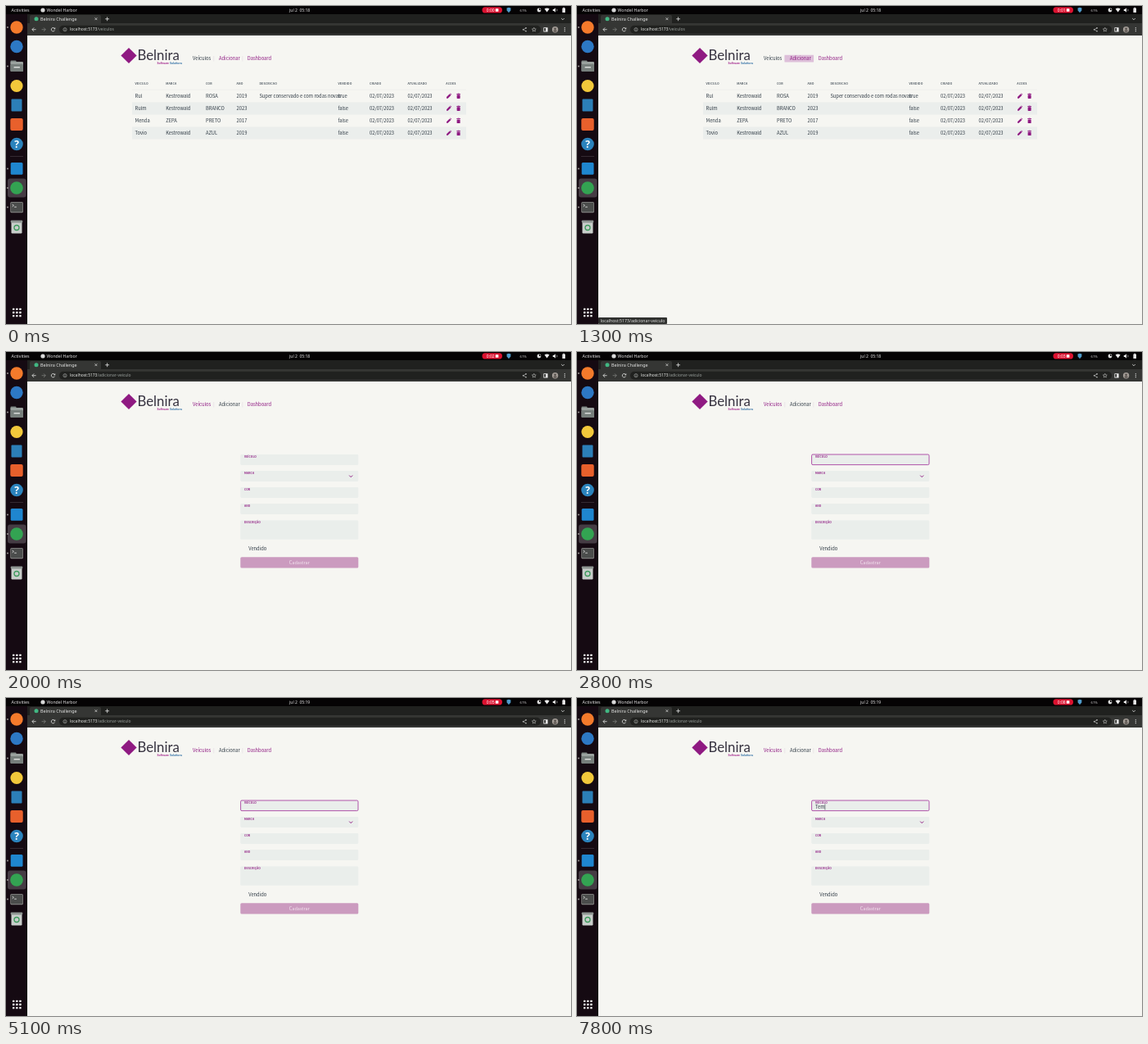
An HTML page with a canvas that plays this animation: 690 px wide and 388 px high, repeating every 8000 ms.

```html
<!DOCTYPE html>
<html lang="pt">
<head>
<meta charset="utf-8">
<title>Belnira Challenge</title>
<style>
html, body { margin: 0; width: 100%; height: 100%; overflow: hidden; background: #f6f6f2; }
canvas { display: block; width: 690px; height: 388px; }
</style>
</head>
<body>
<canvas id="stage"></canvas>
<script>
const W = 690, H = 388, LOOP = 8000;
const LEFT = 26, TOP = 36;
const canvas = document.getElementById('stage');
const ctx = canvas.getContext('2d');
const ratio = window.devicePixelRatio || 1;
canvas.width = W * ratio;
canvas.height = H * ratio;

const SYS = '"Noto Sans", "Open Sans", sans-serif';
const WEB = '"Noto Sans CJK JP", "Noto Sans CJK SC", "Noto Sans CJK", "Noto Sans", sans-serif';
const LOGO = 'Lato, sans-serif';
const PURPLE = '#8f1a82', INK = '#2f3a44', PAGE = '#f6f6f2', FIELD = '#eaeeeb';
const LIGHT = '#e4e5e4', STRIP = '#20211f', BAR = '#353634';

const clamp = v => Math.max(0, Math.min(1, v));

function box(x, y, w, h, color, r = 0) {
  ctx.fillStyle = color;
  ctx.beginPath();
  ctx.roundRect(x, y, w, h, r);
  ctx.fill();
}

function disc(x, y, r, color) {
  ctx.fillStyle = color;
  ctx.beginPath();
  ctx.arc(x, y, r, 0, Math.PI * 2);
  ctx.fill();
}

function ring(x, y, r, color, width = 0.8, from = 0, to = Math.PI * 2) {
  ctx.strokeStyle = color;
  ctx.lineWidth = width;
  ctx.beginPath();
  ctx.arc(x, y, r, from, to);
  ctx.stroke();
}

function trace(points) {
  ctx.beginPath();
  for (let i = 0; i < points.length; i += 2) ctx.lineTo(points[i], points[i + 1]);
}

function line(points, color, width = 0.8) {
  trace(points);
  ctx.strokeStyle = color;
  ctx.lineWidth = width;
  ctx.stroke();
}

function shape(points, color) {
  trace(points);
  ctx.fillStyle = color;
  ctx.fill();
}

// Text is placed by its left edge and the middle of its capitals.
// It is set large and scaled down, so that small sizes keep fractional advances.
const ZOOM = 16;
function label(str, x, y, size, color, { font = SYS, weight = 400, align = 'left', gap = 0 } = {}) {
  ctx.save();
  ctx.translate(x, y + size * 0.345);
  ctx.scale(1 / ZOOM, 1 / ZOOM);
  ctx.font = `${weight} ${size * ZOOM}px ${font}`;
  ctx.letterSpacing = gap * ZOOM + 'px';
  ctx.textAlign = align;
  ctx.fillStyle = color;
  ctx.fillText(str, 0, 0);
  const width = ctx.measureText(str).width / ZOOM;
  ctx.restore();
  return width;
}

const web = (str, x, y, color = INK, size = 5.75) => label(str, x, y, size, color, { font: WEB });

function topBar(t) {
  box(0, 0, W, 10, '#050304');
  label('Activities', 6.5, 5, 5.3, '#e6e6e6');
  disc(45, 5, 2.6, '#d8d8d8');
  label('Wondel Harbor', 49.5, 5, 5.2, '#e6e6e6');
  label('jul 2  05:' + (t < 3700 ? 18 : 19), 346, 5, 5, '#e6e6e6');

  const ticks = [700, 1800, 2700, 3700, 4700, 5700, 6700, 7800];
  box(581.5, 1.2, 24.5, 7.4, '#dc1230', 3.7);
  label('0:0' + ticks.filter(at => t >= at).length, 586.8, 5, 5, '#fff');
  box(597.8, 3.2, 3.6, 3.6, '#fff', 0.4);

  shape([611.5, 2.5, 614, 1.8, 616.5, 2.5, 616.3, 5.5, 614, 8.2, 611.7, 5.5], '#4f9bcb');
  label('61%', 627.5, 5.2, 4.2, '#d8d8d8');
  disc(651, 5, 2.4, '#dedede');
  shape([651, 5, 651, 2.5, 653.4, 5], '#050304');
  shape([657.6, 3.6, 659, 2.8, 660.6, 2.5, 662.2, 2.8, 663.6, 3.6, 660.6, 7.6], '#eee');
  shape([667.8, 4, 669.2, 4, 671, 2.3, 671, 7.7, 669.2, 6, 667.8, 6], '#eee');
  ring(671, 5, 2, '#ddd', 0.6, -0.8, 0.8);
  box(679.4, 2.6, 3.6, 5.4, '#e6e6e6', 0.5);
  box(680.4, 1.8, 1.6, 1, '#e6e6e6');
}

function dock() {
  box(0, 10, LEFT, H - 10, '#150a12');
  box(2, 210.5, 22.5, 23, '#453c44', 3);
  for (const y of [26, 73.5, 198.5, 222, 245.5]) disc(2, y, 0.9, '#a9a5a2');

  disc(13, 26, 7.7, '#f47a2b');
  disc(13, 49.5, 7.7, '#2d78c4');

  box(5.5, 66.5, 7, 4, '#7f8784', 1);
  box(5.5, 68, 15.5, 12, '#9aa19e', 1.2);
  box(5.5, 71, 15.5, 9, '#777f7c', 1.2);
  box(9.5, 74, 7.5, 1.6, '#d9dcda', 0.6);

  disc(13, 97.5, 7.6, '#f2c83b');
  box(6.5, 113.5, 13, 15, '#2c7fb8', 1);
  box(5.3, 137, 15.4, 15, '#e8602c', 2);

  disc(13, 168.5, 7.8, '#2b83bd');
  label('?', 13, 168.5, 12, '#fff', { align: 'center', weight: 600 });
  line([5, 183.5, 21, 183.5], '#4a4048', 0.6);

  box(5.7, 191, 14.8, 14.8, '#1f86cf', 1.5);
  disc(13, 222, 7.8, '#33a352');

  box(5.3, 239, 15.6, 13.2, '#8a8a88', 1.5);
  box(6, 239.8, 14.2, 11.4, '#4b4d4c', 1);
  line([7.7, 242, 9.4, 243.4, 7.7, 244.8], '#f0f0f0', 0.8);
  line([10.2, 245.2, 12.8, 245.2], '#f0f0f0', 0.8);

  box(6.5, 262, 13, 15.5, '#c9cecb', 1.2);
  box(5.8, 261.5, 14.4, 3, '#8f9693', 0.8);
  ring(13, 270.5, 3, '#3f9b5e', 1.3);

  for (let i = 0; i < 9; i++) box(8 + (i % 3) * 4.1, 368.7 + Math.floor(i / 3) * 4.1, 2.4, 2.4, '#f2f2f2', 0.5);
}

function browser(path) {
  box(LEFT, 10, W - LEFT, 12, STRIP);
  box(29, 11, 87, 12, BAR, 2);
  box(LEFT, 21, W - LEFT, TOP - 21, BAR);
  disc(37, 15.8, 2.5, '#41b883');
  label('Belnira Challenge', 42, 15.8, 5.4, LIGHT);
  line([108.5, 14.3, 111.3, 17.1], LIGHT, 0.7);
  line([111.3, 14.3, 108.5, 17.1], LIGHT, 0.7);
  line([121.2, 15.8, 126, 15.8], LIGHT);
  line([123.6, 13.4, 123.6, 18.2], LIGHT);
  line([678.2, 15, 680, 16.8, 681.8, 15], LIGHT);

  line([36.6, 28.7, 32, 28.7], LIGHT);
  line([34.2, 26.4, 31.9, 28.7, 34.2, 31], LIGHT);
  line([43.6, 28.7, 48.2, 28.7], '#7d7e7d');
  line([46, 26.4, 48.3, 28.7, 46, 31], '#7d7e7d');
  ring(57.5, 28.7, 2.2, LIGHT, 0.8, 0.4, 5.6);
  shape([58, 28.2, 60.2, 28.2, 60.2, 26], LIGHT);

  box(65, 23.8, 588, 10, STRIP, 5);
  ring(72, 28.7, 2.1, '#b8b9b8', 0.6);
  line([72, 28.3, 72, 30], '#b8b9b8', 0.6);
  line([72, 27.2, 72, 27.8], '#b8b9b8', 0.6);
  const host = label('localhost:5173', 78, 28.7, 4.93, '#e8eae8');
  label(path, 78 + host, 28.7, 4.93, '#9aa09d');

  line([635, 26.9, 631.6, 28.8, 635, 30.7], '#c3c4c3', 0.6);
  for (const [x, y] of [[635, 26.9], [631.6, 28.8], [635, 30.7]]) disc(x, y, 0.8, '#c3c4c3');
  const star = [];
  for (let i = 0; i <= 10; i++) {
    const a = i * Math.PI / 5 - Math.PI / 2, r = i % 2 ? 1.2 : 2.6;
    star.push(644.8 + r * Math.cos(a), 28.9 + r * Math.sin(a));
  }
  line(star, '#c3c4c3', 0.6);
  box(656.4, 26.2, 5.2, 5.2, '#f0f0f0', 0.5);
  box(657.2, 27, 2, 3.6, BAR);
  disc(670.6, 28.7, 3.7, '#a39c96');
  disc(670.6, 27.8, 1.4, '#56504c');
  box(668.6, 29.4, 4, 2.2, '#56504c', 1);
  for (const y of [26.7, 28.7, 30.7]) disc(682.3, y, 0.6, LIGHT);
}

function header(t) {
  ctx.save();
  ctx.translate(150, 60.5);
  ctx.rotate(Math.PI / 4);
  box(-6.8, -6.8, 13.6, 13.6, '#8f1a82');
  ctx.restore();
  label('Belnira', 160.5, 60.4, 16.8, '#35313f', { font: LOGO });
  const tag = { font: LOGO, weight: 700, align: 'right' };
  const w = label('Solutions', 215, 69.5, 3.6, '#2b6ca3', tag);
  label('Software', 214 - w, 69.5, 3.6, '#a0208a', tag);

  const hover = clamp((t - 950) / 150) * (1 - clamp((t - 1780) / 150));
  const moved = t >= 1500;
  line([253.7, 61, 253.7, 67.5], '#e2d6e0', 0.5);
  line([288.8, 61, 288.8, 67.5], '#e2d6e0', 0.5);
  ctx.globalAlpha = hover;
  box(253.5, 59.8, 35.5, 8.7, '#ddbfd9');
  ctx.globalAlpha = 1;
  web('Veículos', 228, 64.2, moved ? PURPLE : INK);
  web('Adicionar', 260, 64.2, moved && hover < 0.5 ? INK : PURPLE);
  web('Dashboard', 294.7, 64.2, PURPLE);
}

const COLS = [157.5, 195.2, 244, 281.6, 309.4, 405.5, 444, 490.5, 537.3];
const HEADS = ['VEICULO', 'MARCA', 'COR', 'ANO', 'DESCRICAO', 'VENDIDO', 'CRIADO', 'ATUALIZADO', 'ACOES'];
const DAY = '02/07/2023';
const ROWS = [
  ['Rul', 'Kestrowald', 'ROSA', '2019', 'Super conservado e com rodas novas', 'true', DAY, DAY],
  ['Rulm', 'Kestrowald', 'BRANCO', '2023', '', 'false', DAY, DAY],
  ['Menda', 'ZEPA', 'PRETO', '2017', '', 'false', DAY, DAY],
  ['Tovio', 'Kestrowald', 'AZUL', '2019', '', 'false', DAY, DAY]
];

function rowIcons(y) {
  ctx.save();
  ctx.translate(0, y);
  shape([538, 2.8, 538, 1.2, 541.8, -2.6, 543.4, -1, 539.6, 2.8], PURPLE);
  shape([542.2, -3, 542.8, -3.4, 544.2, -2, 543.8, -1.4], PURPLE);
  box(550.2, -2.8, 4.8, 0.8, PURPLE);
  box(551.6, -3.3, 2, 0.8, PURPLE);
  box(550.6, -1.6, 4, 4.6, PURPLE, 0.6);
  ctx.restore();
}

function table() {
  const style = { font: WEB, weight: 700, gap: 0.2 };
  HEADS.forEach((s, i) => label(s, COLS[i], 95.2, 3.5, '#525c65', style));
  line([154, 102.2, 562, 102.2], '#e9eae7', 0.6);
  ROWS.forEach((row, r) => {
    const y = 109.9 + r * 15.05;
    if (r % 2) box(154, y - 7.5, 408, 15, '#ebeeec');
    row.forEach((s, i) => web(s, COLS[i], y));
    rowIcons(y);
  });
}

function form(t) {
  const fields = [['VEÍCULO', 125, 13], ['MARCA', 145, 13], ['COR', 165, 13], ['ANO', 185, 13], ['DESCRIÇÃO', 205.5, 23.3]];
  const focused = t >= 2100;
  fields.forEach(([name, y, h], i) => {
    box(286.3, y, 144, h, FIELD, 1.4);
    if (!i && focused) {
      ctx.strokeStyle = '#a02c98';
      ctx.lineWidth = 0.8;
      ctx.beginPath();
      ctx.roundRect(286.6, y, 143.4, h - 0.4, 1.4);
      ctx.stroke();
    }
    label(name, 291, y + 2.5, 3.3, PURPLE, { font: WEB, weight: 700, gap: 0.14 });
  });
  line([419.2, 150.6, 421.2, 152.6, 423.2, 150.6], PURPLE, 1);
  web('Vendido', 296.2, 239.7);
  box(286.3, 250.3, 144, 13.2, '#cb9bbf', 1.5);
  label('Cadastrar', 358.2, 257, 5.5, '#f3e6f0', { font: WEB, align: 'center' });

  if (!focused) return;
  const typed = 'Tem'.slice(0, [7200, 7400, 7600].filter(at => t >= at).length);
  const w = typed ? web(typed, 291, 133.1) : 0;
  const caret = typed || Math.floor((t - 2100) / 600) % 2 === 0;
  if (caret) box(291.1 + w, 129.6, 0.6, 7, INK);
}

function draw(t) {
  ctx.setTransform(ratio, 0, 0, ratio, 0, 0);
  box(0, 0, W, H, PAGE);
  const onForm = t >= 1400;
  browser(onForm ? '/adicionar-veiculo' : '/veiculos');
  dock();
  topBar(t);
  header(t);
  if (onForm) form(t); else table();
  if (t >= 1300 && t < 1950) {
    box(LEFT, 380, 84, 8, '#30312f', 1);
    label('localhost:5173/adicionar-veiculo', 28.7, 384, 5.2, '#e0e1e0');
  }
}

function tick(now) {
  draw(now % LOOP);
  requestAnimationFrame(tick);
}
requestAnimationFrame(tick);
</script>
</body>
</html>
```
